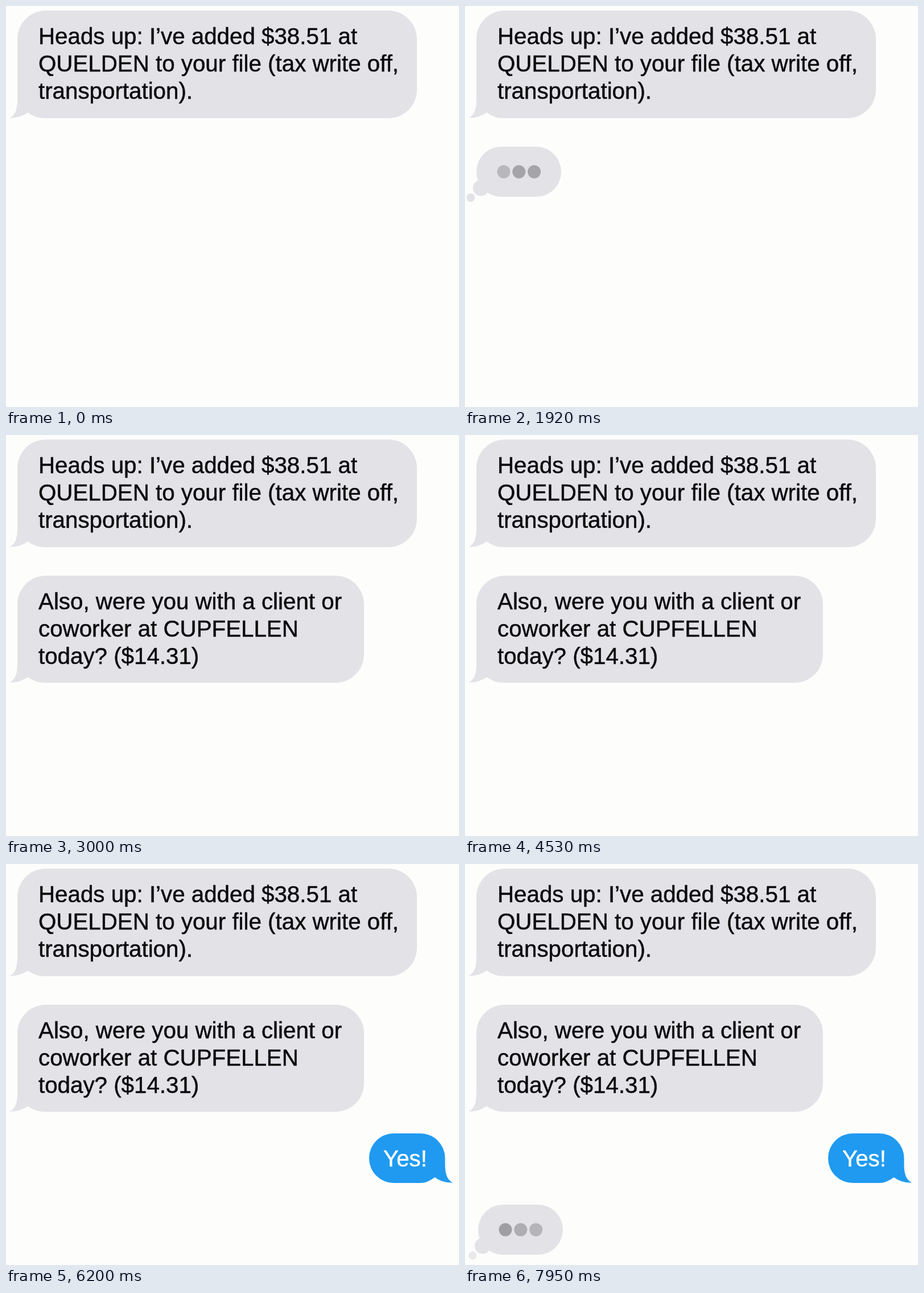
An HTML page with a canvas that plays this animation: 796 px wide and 704 px high, repeating every 8000 ms.

```html
<!DOCTYPE html>
<html lang="en">
<head>
<meta charset="utf-8">
<title>Chat</title>
<style>
html, body { margin: 0; width: 100%; height: 100%; overflow: hidden; background: #fdfdfc; }
canvas { display: block; }
</style>
</head>
<body>
<canvas id="stage" width="796" height="704"></canvas>
<script>
const ctx = document.getElementById('stage').getContext('2d');
const LOOP = 8000;
const GREY = '#e3e2e7', BLUE = '#1f9af0', INK = '#0a0a0c', PAPER = '#fdfdfc';

const messages = [
  { x: 20, y: 8, w: 702, h: 189, r: 50, fill: GREY, ink: INK, tx: 57, ty: 67, start: -1000,
    lines: ['Heads up: I’ve added $38.51 at', 'QUELDEN to your file (tax write off,', 'transportation).'] },
  { x: 20, y: 247, w: 609, h: 188, r: 50, fill: GREY, ink: INK, tx: 57, ty: 306, start: 2630,
    lines: ['Also, were you with a client or', 'coworker at CUPFELLEN', 'today? ($14.31)'] },
  { x: 638, y: 473, w: 133.5, h: 87, r: 43.5, fill: BLUE, ink: '#fff', tx: 663, ty: 531, start: 5700,
    lines: ['Yes!'], sent: true }
];

const typings = [
  { x: 20, y: 247, lift: 2, start: 430, end: 2670 },
  { x: 23, y: 598, lift: 0, start: 7080, end: LOOP + 1000 }
];

const ramp = (t, a, b) => Math.min(1, Math.max(0, (t - a) / (b - a)));
const smooth = p => p * p * (3 - 2 * p);

// Coordinates run from the tail side inwards, so sent bubbles are mirrored.
function bubblePath({ x, y, w, h, r, sent }) {
  const px = u => sent ? x + w - u : x + u;
  const corner = (u1, v1, u2, v2) => ctx.arcTo(px(u1), y + v1, px(u2), y + v2, r);
  const curve = (u1, v1, u2, v2) => ctx.quadraticCurveTo(px(u1), y + v1, px(u2), y + v2);
  ctx.beginPath();
  ctx.moveTo(px(r), y);
  corner(w, 0, w, h);
  corner(w, h, 0, h);
  ctx.lineTo(px(r), y + h);
  curve(31, h, 18, h - 10);
  curve(5, h, -14, h - 0.5);
  curve(0, h - 6, 0, h - 32);
  ctx.lineTo(px(0), y + r);
  corner(0, 0, r, 0);
  ctx.closePath();
}

function drawMessage(m, t) {
  const alpha = ramp(t, m.start, m.start + 300);
  if (!alpha) return;
  ctx.globalAlpha = alpha;
  ctx.fillStyle = m.fill;
  bubblePath(m);
  ctx.fill();
  ctx.fillStyle = ctx.strokeStyle = m.ink;
  m.lines.forEach((line, i) => {
    ctx.fillText(line, m.tx, m.ty + i * 48);
    ctx.strokeText(line, m.tx, m.ty + i * 48);
  });
}

function disc(x, y, r, fill, alpha) {
  ctx.globalAlpha = alpha;
  ctx.fillStyle = fill;
  ctx.beginPath();
  ctx.arc(x, y, r, 0, Math.PI * 2);
  ctx.fill();
}

function drawTyping(b, t) {
  const age = t - b.start;
  const alpha = ramp(age, 0, 350) * (1 - ramp(t, b.end, b.end + 250));
  if (!alpha) return;
  const big = ramp(age, 660, 860), small = ramp(age, 670, 930);
  const y = b.y - b.lift * (1 - smooth(ramp(age, 740, 1000)));

  disc(b.x + 10 - 2 * big, y + 72.5, 14, GREY, alpha * big);
  disc(b.x - 8 - 2 * small, y + 89.5, 6 + 1.5 * small, GREY, alpha * small);

  ctx.globalAlpha = alpha;
  ctx.fillStyle = GREY;
  ctx.beginPath();
  ctx.roundRect(b.x, y, 149, 88, 44);
  ctx.fill();

  for (let i = 0; i < 3; i++) {
    const wave = Math.cos(2 * Math.PI * (t / 1085 - 0.278 - i / 3));
    const v = Math.round(171 - 13 * wave);
    disc(b.x + 48 + i * 26.8, y + 44, 11.5, `rgb(${v},${v},${v + 4})`, alpha);
  }
}

function draw(t) {
  ctx.globalAlpha = 1;
  ctx.fillStyle = PAPER;
  ctx.fillRect(0, 0, 796, 704);
  ctx.font = '40.3px "Liberation Sans", Arial, sans-serif';
  ctx.lineWidth = 0.5;
  ctx.lineJoin = 'round';
  typings.forEach(b => drawTyping(b, t));
  messages.forEach(m => drawMessage(m, t));
}

const begin = performance.now();
function tick() {
  draw((performance.now() - begin) % LOOP);
  requestAnimationFrame(tick);
}
tick();
</script>
</body>
</html>
```
